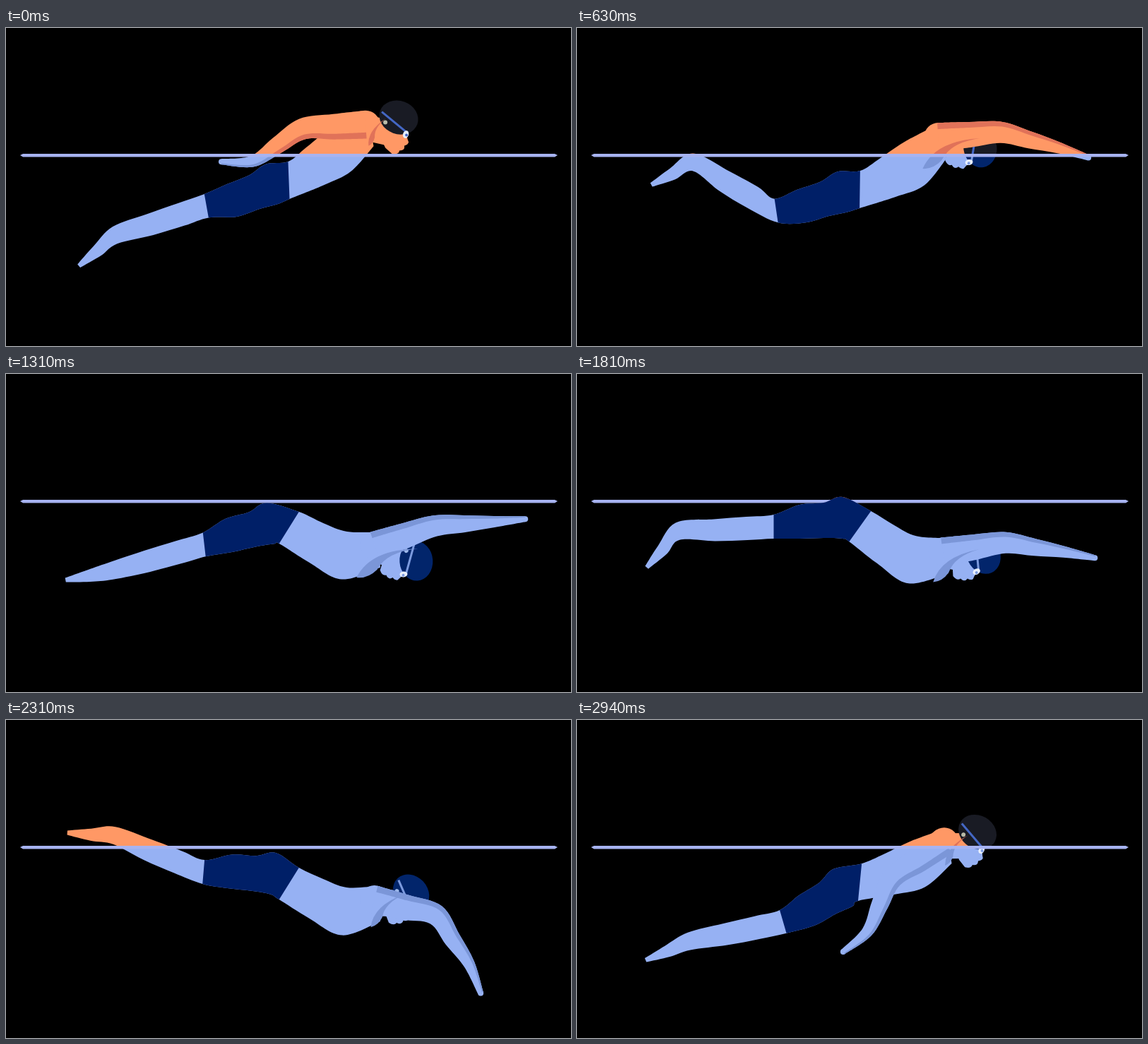
An HTML page with a canvas for the animation above (3000 ms loop, 800 px wide and 450 px high).

```html
<!DOCTYPE html>
<html lang="en">
<head>
<meta charset="utf-8">
<title>Butterfly stroke</title>
<style>
  html, body { margin: 0; width: 100%; height: 100%; overflow: hidden; background: #000; }
  canvas { display: block; width: 800px; height: 450px; }
</style>
</head>
<body>
<canvas id="stage" width="800" height="450"></canvas>
<script>
const ctx = document.getElementById('stage').getContext('2d');
const LOOP = 3000, STEPS = 48, STROKE = 50; // the loop cuts the full stroke a little short
const SURFACE = 180, RECOVERY = 10;
const AIR = { skin: '#ff9865', shade: '#e07259', cap: '#191b24', strap: '#4467c4', badge: '#b9bba8' };
const WATER = { skin: '#96b1f3', shade: '#7b96d8', cap: '#02256b', strap: '#7c9ade', badge: '#9db8ea' };
const SHORTS = '#001f67', LINE = '#a7b3f1', GOGGLE = '#e8effc';

// Joint angles in degrees at the key steps; legs point left, trunk and arm point right.
const KEYS = [0, 10, 17, 21, 29, 37, 47];
const RIG = {
  waist: [216, 229, 223, 218, 216, 232, 230], // height on the stage
  thigh: [17, 14, 16, 11, 0, -8, 27],
  leg: [18, -30, -3, 16, 3, -22, 12],
  foot: [40, 28, -8, 11, 49, -4, 23],
  trunk: [-32, -27, 0, 25, 31, 25, -19],
  chest: [-33, -36, -14, -7, -4, -10, -28],
  upperArm: [176, -4, -10, -18, -8, 14, 145],
  foreArm: [147, 15, -2, -4, 9, 56, 115],
  neck: [-22, 10, 33, 17, -2, -19, -26],
  tilt: [0, 60, 68, 66, 45, 27, 10]
};

// Cubic interpolation through the keys of a cyclic channel.
function sample(values, step) {
  const n = KEYS.length, wrap = i => (i + n) % n;
  let i = n - 1;
  while (KEYS[i] > step) i--;
  const near = [i - 1, i, i + 1, i + 2];
  const [ta, tb, tc, td] = near.map(j => KEYS[wrap(j)] + STROKE * Math.floor(j / n));
  const [a, b, c, d] = near.map(j => values[wrap(j)]);
  const h = tc - tb, s = (step - tb) / h, r = 1 - s, slope = (c - b) / h;
  const m0 = ((b - a) / (tb - ta) + slope) / 2;
  const m1 = (slope + (d - c) / (td - tc)) / 2;
  return b * r * r * (1 + 2 * s) + c * s * s * (3 - 2 * s) + h * s * r * (m0 * r - m1 * s);
}

const rad = deg => deg * Math.PI / 180;
const polar = ([x, y], len, deg, lift = 1) =>
  [x + len * Math.cos(rad(deg)), y + len * Math.sin(rad(deg)) * lift];
const mix = (p, q, k) => [p[0] + (q[0] - p[0]) * k, p[1] + (q[1] - p[1]) * k];

// Turns joint angles into outlines: each section of the body has a centre, a lean and a girth.
function solve(step) {
  const a = {};
  for (const name in RIG) a[name] = sample(RIG[name], step);

  const waist = [400.5, a.waist];
  const hem = polar(waist, 122, 180 - a.thigh);
  const ankle = polar(hem, 136, 180 - a.leg);
  const toe = polar(ankle, 67, 180 - a.foot);
  const chest = polar(waist, 87, a.trunk);
  const neck = polar(chest, 50, a.chest);
  const bow = a.trunk * 0.16; // the hips rise as the trunk dives

  const upper = [], lower = [];
  const section = (p, lean, up, down) => {
    upper.push(polar(p, up, lean - 90));
    lower.push(polar(p, down, lean + 90));
  };
  section(toe, -a.foot, 3, 3);
  section(mix(toe, ankle, 0.5), -a.foot, 8, 9);
  section(ankle, -(a.leg + a.foot) / 4, 13, 12);
  section(mix(ankle, hem, 0.38), -a.leg, 15, 16);
  section(mix(ankle, hem, 0.72), -a.leg, 16, 17);
  section(hem, -a.thigh * 0.6, 17, 17);
  section(mix(hem, waist, 0.3), -a.thigh, 26 + bow, 22 - bow);
  section(mix(hem, waist, 0.58), -a.thigh, 29 + bow, 21 - bow);
  section(mix(hem, waist, 0.8), -a.thigh, 37 + bow, 22 - bow);
  section(waist, 17 + a.trunk * 0.6, 27, 26);
  section(mix(waist, chest, 0.5), a.trunk * 0.8, 27, 32);
  section(chest, (a.trunk + a.chest) * 0.35, 32, 36);
  section(neck, a.chest * 0.3, 25, 25);

  // The arm swings out sideways while it recovers, so its height flattens.
  const lift = step < RECOVERY ? 1 - 0.75 * Math.sin(Math.PI * step / RECOVERY) : 1;
  const shoulder = [neck[0] - 7, neck[1] - 6];
  const elbow = polar(shoulder, 90, a.upperArm, lift);
  const wrist = polar(elbow, 84, a.foreArm, lift);
  const hand = polar(wrist, 44, a.foreArm * 1.22, lift);
  const arm = [shoulder, mix(shoulder, elbow, 0.5), elbow, mix(elbow, wrist, 0.5), wrist, hand];

  const head = polar(neck, 43 + a.tilt * 0.17, a.neck);
  return { upper, lower, arm, neck, head, tilt: a.tilt };
}

// Adds a smooth curve through pts[from..to]; neighbours outside the range still shape it.
function curve(path, pts, from, to) {
  const at = i => pts[Math.max(0, Math.min(pts.length - 1, i))];
  const dir = Math.sign(to - from);
  path.lineTo(...at(from));
  for (let i = from; i !== to; i += dir) {
    const [a, b, c, d] = [-1, 0, 1, 2].map(j => at(i + j * dir));
    path.bezierCurveTo(
      b[0] + (c[0] - a[0]) / 6, b[1] + (c[1] - a[1]) / 6,
      c[0] - (d[0] - b[0]) / 6, c[1] - (d[1] - b[1]) / 6, c[0], c[1]);
  }
}

function band(one, two, from = 0, to = one.length - 1) {
  const path = new Path2D();
  curve(path, one, from, to);
  curve(path, two, to, from);
  path.closePath();
  return path;
}

function fill(path, color) {
  ctx.fillStyle = color;
  ctx.fill(path);
}

function oval(x, y, rx, ry, turn, color) {
  const path = new Path2D();
  path.ellipse(x, y, rx, ry, turn, 0, 2 * Math.PI);
  fill(path, color);
}

const dot = (x, y, r, color) => oval(x, y, r, r, 0, color);

function line(a, b, width, color) {
  ctx.strokeStyle = color;
  ctx.lineWidth = width;
  ctx.beginPath();
  ctx.moveTo(...a);
  ctx.lineTo(...b);
  ctx.stroke();
}

const face = new Path2D('M-22 8L12 16Q10 26 14 35Q13 39 8 40Q9 47 1 47Q0 53 -9 52L-19 43L-26 28Z');
const hollow = new Path2D('M-29 39Q-12 0 52 -4Q10 2 -2 27Q-14 40 -29 39Z');

function drawHead({ head, neck, tilt }, tone) {
  const throat = polar(polar(head, -13, tilt), 22, tilt + 90);
  ctx.lineCap = 'round';
  line(neck, throat, 36, tone.skin);
  ctx.save();
  ctx.translate(...head);
  ctx.rotate(rad(tilt));
  fill(face, tone.skin);
  oval(0, 0, 28, 23.5, 0.35, tone.cap);
  ctx.lineCap = 'butt';
  line([-24, -8], [10, 20], 3, tone.strap);
  oval(10, 24, 4, 5.5, 0.3, GOGGLE);
  dot(11, 25, 2, tone.strap);
  dot(-19, 7, 3, tone.badge);
  ctx.restore();
}

function drawArm({ arm }, tone) {
  const girth = [20, 18, 15, 12, 8, 4], last = arm.length - 1;
  const side = k => arm.map(([x, y], i) => {
    const p = arm[Math.max(0, i - 1)], q = arm[Math.min(last, i + 1)];
    const dx = q[0] - p[0], dy = q[1] - p[1];
    const r = k * girth[i] / (Math.hypot(dx, dy) || 1);
    return [x - dy * r, y + dx * r];
  });
  const outer = side(-1);
  dot(...arm[0], girth[0], tone.skin);
  fill(band(side(1), outer), tone.skin);
  dot(...arm[last], girth[last], tone.skin);
  fill(band(side(-0.55), outer), tone.shade);
}

function drawHollow({ neck, tilt }, tone) {
  const size = 0.5 + tilt / 120;
  ctx.save();
  ctx.translate(...neck);
  ctx.rotate(rad((tilt - 60) / 2));
  ctx.scale(size, size);
  fill(hollow, tone.shade);
  ctx.restore();
}

function drawSkin(pose, tone, top, height) {
  ctx.save();
  ctx.beginPath();
  ctx.rect(0, top, 800, height);
  ctx.clip();
  fill(band(pose.upper, pose.lower), tone.skin);
  drawHead(pose, tone);
  drawArm(pose, tone);
  drawHollow(pose, tone);
  ctx.restore();
}

const surface = new Path2D('M20 180L24 178H777L781 180L777 182.5H24Z');

function draw(step) {
  const pose = solve(step);
  ctx.fillStyle = '#000';
  ctx.fillRect(0, 0, 800, 450);
  drawSkin(pose, AIR, 0, SURFACE);
  drawSkin(pose, WATER, SURFACE, 450 - SURFACE);
  fill(surface, LINE);
  fill(band(pose.upper, pose.lower, 5, 9), SHORTS);
}

const start = performance.now();
function tick() {
  const time = (performance.now() - start) % LOOP;
  draw(Math.floor(time * STEPS / LOOP + 0.1) % STEPS);
  requestAnimationFrame(tick);
}
tick();
</script>
</body>
</html>
```
